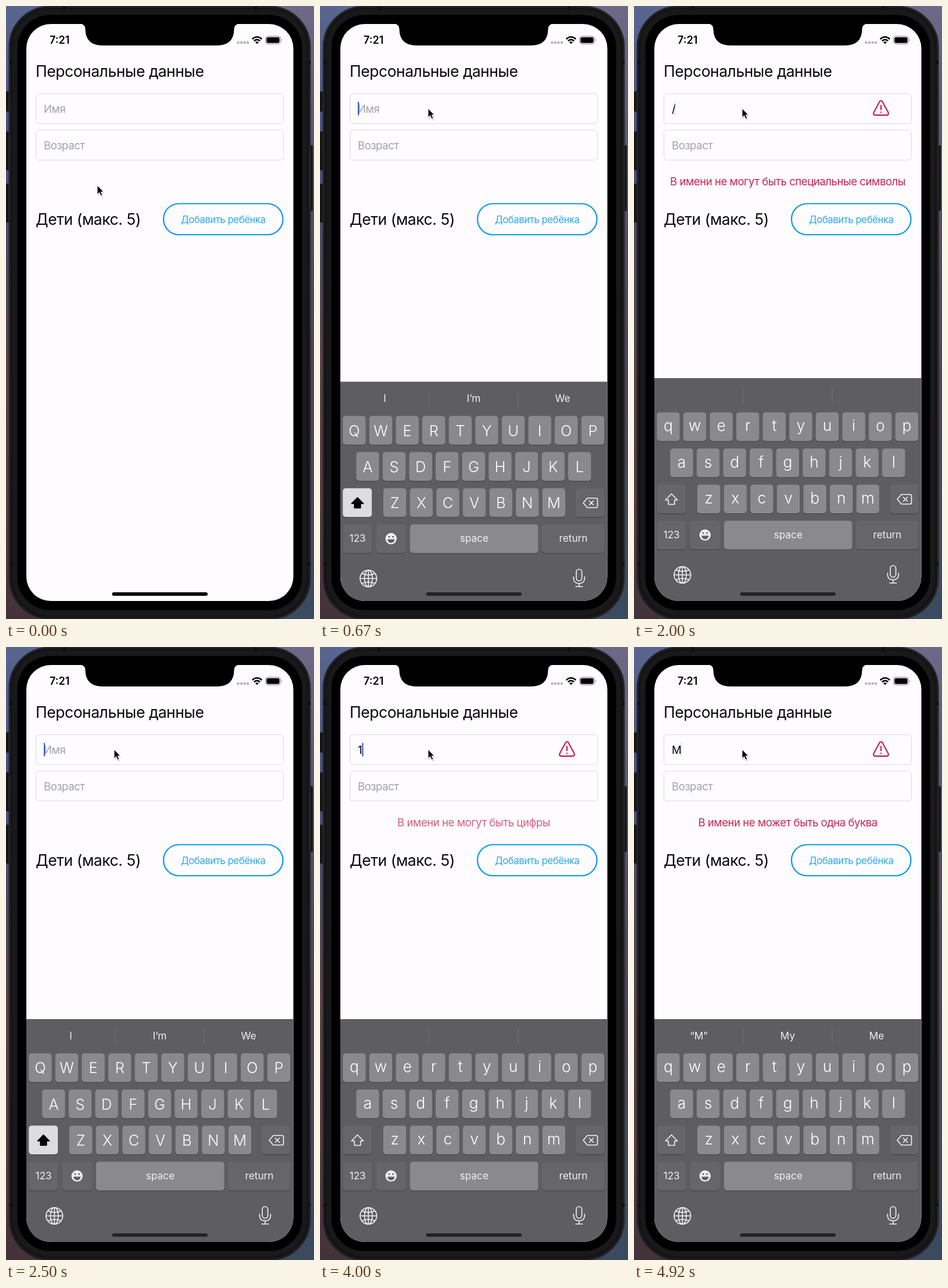
Write an HTML page that moves like this. It is 530 px wide and 1056 px high and loops after 5010 ms.

```html
<!DOCTYPE html>
<html lang="ru">
<head>
<meta charset="utf-8">
<style>
html, body { margin: 0; width: 100%; height: 100%; overflow: hidden; background: #17171a; }
svg { display: block; width: 530px; height: 1056px; font-family: Inter, "Open Sans", sans-serif; }
text { white-space: pre; }
.form { letter-spacing: -.025em; font-size: 18.6px; }
.heading { font-size: 26.5px; fill: #08080a; }
.hint { fill: #a2a1a5; }
.error { fill: #c9264f; text-anchor: middle; }
.key { fill: #fff; font-weight: 300; text-anchor: middle; }
.label { fill: #f1f0f3; font-size: 17.2px; text-anchor: middle; }
.line { fill: none; stroke: #f4f3f6; stroke-width: 1.6; stroke-linecap: round; stroke-linejoin: round; }
</style>
</head>
<body>
<svg id="stage" viewBox="0 0 530 1056"></svg>
<script>
const LOOP = 5010, KEYBOARD_START = 475, KEYBOARD_HEIGHT = 384;
const DEFAULTS = ['I', 'I’m', 'We'];
const SYMBOLS = 'В имени не могут быть специальные символы';
const DIGITS = 'В имени не могут быть цифры';
const ONE_LETTER = 'В имени не может быть одна буква';

// What the name field holds from each moment on
const states = [
  { at: KEYBOARD_START, value: '', error: '', words: DEFAULTS, caret: 65 },
  { at: 1165, value: '/', error: SYMBOLS, words: [], caret: 69 },
  { at: 2320, value: '', error: '', words: DEFAULTS, caret: 65 },
  { at: 2800, value: '9', error: DIGITS, words: ['“9”'], caret: 76.5 },
  { at: 3700, value: '', error: '', words: [], caret: 65 },
  { at: 3920, value: '1', error: DIGITS, words: ['“1”'], caret: 72.3 },
  { at: 4420, value: '', error: '', words: [], caret: 65 },
  { at: 4585, value: 'M', error: ONE_LETTER, words: ['“M”', 'My', 'Me'], caret: 80 },
];

const rect = (x, y, w, h, r, fill, extra = '') =>
  `<rect x="${x}" y="${y}" width="${w}" height="${h}" rx="${r}" fill="${fill}" ${extra}/>`;
const text = (x, y, cls, content, extra = '') =>
  `<text x="${x}" y="${y}" class="${cls}" ${extra}>${content}</text>`;
const gradient = (id, colors) =>
  `<linearGradient id="${id}" x2="0" y2="1">${colors.map((c, i) =>
    `<stop offset="${i / (colors.length - 1)}" stop-color="${c}"/>`).join('')}</linearGradient>`;

const LIGHT = '#8a898d', DARK = '#666569';
const key = (x, y, w, fill) =>
  rect(x, y + 1.3, w, 49.5, 5, '#454447') + rect(x, y, w, 49.5, 5, fill);

const rows = [['QWERTYUIOP', 39.2, 700], ['ASDFGHJKL', 62.2, 762.3], ['ZXCVBNM', 109, 824.5]];
const eachKey = draw => rows.map(([letters, x, y]) =>
  [...letters].map((c, i) => draw(c, x + i * 45.6, y)).join('')).join('');

const phone = `
  <defs>
    ${gradient('wallLeft', ['#59668f', '#465182', '#4b4a5f', '#5a4146', '#573c40', '#43323a'])}
    ${gradient('wallRight', ['#6d6987', '#5a5878', '#514b63', '#4b4557', '#46485b', '#3a4a5f'])}
    <clipPath id="screen"><rect x="35" y="31" width="459.5" height="994" rx="42"/></clipPath>
  </defs>
  ${rect(0, 0, 265, 1056, 0, 'url(#wallLeft)')}${rect(265, 0, 265, 1056, 0, 'url(#wallRight)')}
  ${[[0, 147, 35], [0, 216, 67], [0, 306, 67], [522, 240, 113]].map(([x, y, h]) =>
    rect(x, y, 6, h, 1.5, '#151518')).join('')}
  ${rect(5.5, .5, 518, 1056, 70, '#19191b', 'stroke="#29292d" stroke-width="2"')}
  ${rect(10, 5, 509, 1046, 66, 'none', 'stroke="#121214" stroke-width="2"')}
  ${[[6, 94], [518, 94], [6, 958], [518, 958]].map(([x, y]) => rect(x, y, 6, 6, 0, '#101012')).join('')}
  ${[98, 426].map(x => rect(x, 1, 6, 7, 0, '#101012')).join('')}
  ${rect(19.5, 15.5, 490, 1025, 56, '#000')}
  ${rect(35, 31, 459.5, 994, 42, '#fefcff')}
  <path d="M127 30.5Q136.500 31 136.500 40Q137 68 166 68H363Q392 68 392.500 40Q392.500 31 402 30.500Z"/>
  ${text(75, 65, '', '7:21', 'font-size="18" font-weight="600"')}
  ${[399.5, 405, 410.5, 416].map(x => `<circle cx="${x}" cy="63" r="2.300" fill="#b5b4b8"/>`).join('')}
  <g fill="none" stroke="#000" stroke-width="2.600">
    <path d="M423.800 57Q432 49.500 440.200 57M426.800 60.300Q432 55.500 437.200 60.300"/>
  </g>
  <path d="M429 62.300Q432 60 435 62.300L432 65.500Z"/>
  ${rect(446.5, 52, 26, 13.5, 4, 'none', 'stroke="#88878a"')}
  ${rect(448.2, 53.7, 22.5, 10, 2.6, '#000')}
  <path d="M474 56.500q2 2.200 0 4.500Z" fill="#88878a"/>`;

const form = `<g class="form">
  ${text(51, 122, 'heading', 'Персональные данные')}
  ${[151, 213.8].map(y => rect(51.5, y, 426, 51.6, 5, '#fefcff', 'stroke="#d9d8dc"')).join('')}
  ${text(65, 183.5, 'hint', 'Имя', 'id="hint"')}
  ${text(65, 246.5, 'hint', 'Возраст')}
  ${text(51, 377, 'heading', 'Дети (макс. 5)')}
  ${rect(271, 340.5, 205.5, 53.5, 26.7, 'none', 'stroke="#0c98ea" stroke-width="2.2"')}
  ${text(373.7, 374, '', 'Добавить ребёнка', 'font-size="16.8" style="font-size:16.8px" fill="#31a8eb" text-anchor="middle"')}
  ${text(65, 183.5, '', '', 'id="value"')}
  ${text(264.5, 309, 'error', '', 'id="error"')}
  ${rect(0, 165, 2.2, 23.5, 1, '#3d59c9', 'id="caret"')}
  <g id="alert" fill="none" stroke="#c9264f" stroke-width="2.300" stroke-linecap="round" stroke-linejoin="round">
    <path d="M422.700 164.500Q425 161.800 427.300 164.500L437.500 183.500Q438.800 187.600 435 188H415Q411.200 187.600 412.500 183.500ZM425 171.500V178.500M425 183V183.200"/>
  </g>
</g>`;

const keyboard = `<g clip-path="url(#screen)"><g id="keyboard">
  ${rect(35, 641, 460, 390, 0, '#5e5d61')}
  ${[187, 340.5].map(x => rect(x, 656, 1, 28, 0, '#717074')).join('')}
  ${[111.5, 264.5, 417.5].map(x => text(x, 676, 'label', '<tspan></tspan><tspan></tspan>', 'data-word')).join('')}
  ${eachKey((c, x, y) => key(x, y, 39.5, LIGHT))}
  <g id="upper">${eachKey((c, x, y) => text(x + 19.8, y + 34.3, 'key', c, 'font-size="25.5"'))}</g>
  <g id="lower">${eachKey((c, x, y) => text(x + 19.8, y + 32.2, 'key', c.toLowerCase(), 'font-size="26.5"'))}</g>
  <g id="shift">${key(39.2, 824.5, 50, DARK)}</g>
  <path id="arrow" class="line" d="M64.500 840.500L74.800 851H69.800V858.500H59.200V851H54.200Z"/>
  ${key(440, 824.5, 49.7, DARK)}
  <path class="line" d="M453 849.700L460 841.500H475Q477.500 841.500 477.500 844V855.500Q477.500 858 475 858H460ZM463.500 846.200L470.500 853.300M470.500 846.200L463.500 853.300"/>
  ${key(39.2, 886.7, 50.5, DARK)}${text(64.7, 917, 'label', '123')}
  ${key(97, 886.7, 51, DARK)}
  <circle cx="122.300" cy="911.300" r="9.700" fill="#efeef1"/>
  <path d="M116 912.500H128.600Q127.500 918.500 122.300 918.500T116 912.500Z" fill="#5e5d61"/>
  <circle cx="119" cy="908" r="1.500" fill="#5e5d61"/><circle cx="125.600" cy="908" r="1.500" fill="#5e5d61"/>
  ${key(155, 886.7, 220.5, LIGHT)}${text(265.3, 916.5, 'label', 'space')}
  ${key(382, 886.7, 107.7, DARK)}${text(436, 916.5, 'label', 'return')}
  <g class="line">
    <circle cx="83.300" cy="980" r="14.300"/><ellipse cx="83.300" cy="980" rx="6.800" ry="14.300"/>
    <path d="M83.300 965.700V994.300M69 980H97.600M72.300 971.500Q83.300 976.500 94.300 971.500M72.300 988.500Q83.300 983.500 94.300 988.500"/>
    <rect x="441" y="964" width="9.600" height="20" rx="4.800"/>
    <path d="M436.300 977V980Q436.800 988.500 445.800 988.500T455.300 980V977M445.800 988.500V994M440 994H451.600"/>
  </g>
</g></g>`;

const pointer = `<g id="pointer">
  <path d="M1 2V17L4.700 13.700L7.500 19.500L10 18.300L7.500 12.800H12.300Z" fill="#000" opacity=".16" transform="translate(0 1.500)"/>
  <path d="M0 0V15.500L3.600 12.300L6.300 18L8.900 16.800L6.300 11.200H11Z" stroke="#fff" stroke-width="1"/>
</g>`;

const stage = document.getElementById('stage');
stage.innerHTML = phone + form + keyboard + rect(182.5, 1010, 164.5, 6, 3, '#000', 'id="home"') + pointer;

const el = {};
stage.querySelectorAll('[id]').forEach(node => el[node.id] = node);
const wordSlots = [...stage.querySelectorAll('[data-word]')];
const shiftFace = el.shift.lastElementChild;

const clamp = v => Math.max(0, Math.min(1, v));
const ramp = (t, from, length) => clamp((t - from) / length);
const show = (node, on) => node.style.display = on ? '' : 'none';

function caretOpacity(age) {
  const phase = age % 500;
  return phase < 450 ? 1 - ramp(phase, 270, 80) : ramp(phase, 450, 50);
}

// Old words leave last letter first, then new ones fade in
function drawWords(state, previous, age) {
  const changed = previous && previous.words !== state.words;
  const leaving = changed && previous.words.length && age < 150;
  const words = leaving ? previous.words : state.words;
  const fadeIn = changed ? ramp(age, 90, 75) : 1;
  wordSlots.forEach((slot, i) => {
    const word = words[i] || '';
    const [head, tail] = slot.children;
    head.textContent = word.slice(0, -1);
    tail.textContent = word.slice(-1);
    head.setAttribute('fill-opacity', leaving ? 1 - ramp(age, 70, 80) : fadeIn);
    tail.setAttribute('fill-opacity', leaving ? 1 - ramp(age, 0, 115) : fadeIn);
  });
}

function draw(t) {
  const index = states.findLastIndex(s => s.at <= t);
  const focused = index >= 0;
  const state = states[Math.max(index, 0)];
  const previous = states[index - 1];
  const age = Math.max(0, t - state.at);

  const move = ramp(t, 20, 310);
  const eased = move * move * (3 - 2 * move);
  el.pointer.setAttribute('transform', `translate(${157 + 29 * eased} ${309 - 132.5 * eased})`);

  // Critically damped spring
  const spring = Math.max(0, t - KEYBOARD_START) * .031;
  const remaining = (1 + spring) * Math.exp(-spring);
  el.keyboard.setAttribute('transform', `translate(0 ${(KEYBOARD_HEIGHT * remaining).toFixed(2)})`);
  show(el.keyboard, focused);
  el.home.setAttribute('fill', focused ? '#252427' : '#000');

  const upper = !state.value;
  show(el.upper, upper);
  show(el.lower, !upper);
  shiftFace.setAttribute('fill', upper ? '#dddce0' : DARK);
  el.arrow.style.fill = upper ? '#000' : 'none';
  el.arrow.style.stroke = upper ? '#000' : '';

  show(el.hint, upper);
  el.value.textContent = state.value;
  el.caret.setAttribute('x', state.caret);
  el.caret.setAttribute('opacity', focused ? caretOpacity(age) : 0);
  show(el.alert, state.error);

  const fade = ramp(age, 0, 110);
  el.error.textContent = state.error || (previous ? previous.error : '');
  el.error.setAttribute('opacity', state.error ? fade : 1 - fade);
  drawWords(state, previous, age);
}

function tick() {
  draw(performance.now() % LOOP);
  requestAnimationFrame(tick);
}
tick();
</script>
</body>
</html>
```
